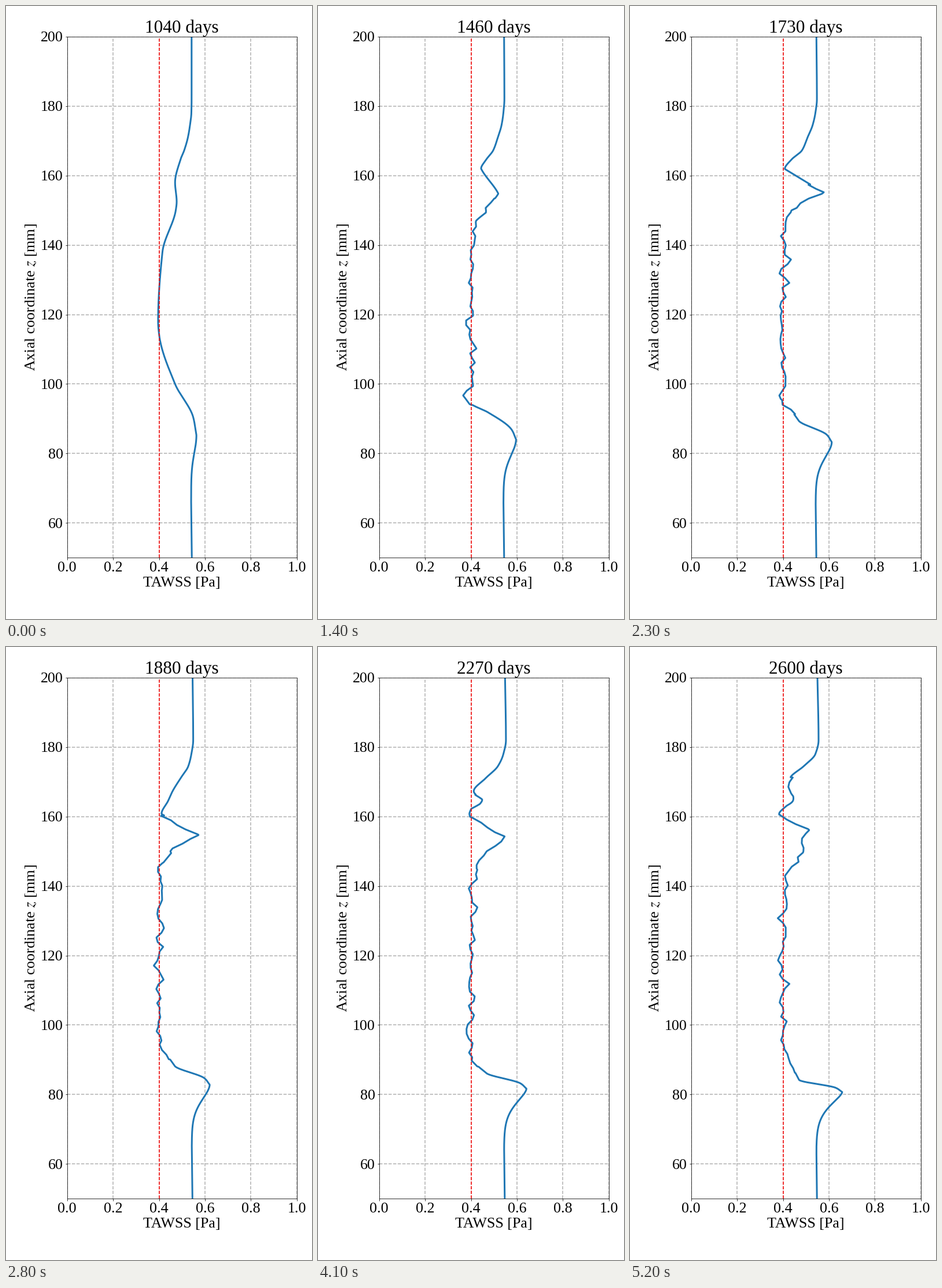
A matplotlib script for the animation above (5300 ms loop, 529 by 1058 pixels).

```python
import numpy as np
import matplotlib.pyplot as plt
from matplotlib.animation import FuncAnimation

WIDTH, HEIGHT, DPI = 529, 1058, 72
FRAMES, INTERVAL = 53, 100
FIRST_DAY, DAY_STEP = 1040, 30

plt.rcParams.update({
    "font.family": "Liberation Serif",
    "mathtext.fontset": "stix",
    "font.size": 26,
})

# How each feature of the curve moves: positions in mm, stresses in mPa.
TIMES = [0, 9, 14, 23, 33, 41, 52]
FOOT = [100, 95.8, 92, 89.3, 86.9, 86, 84.2]
PLATEAU = [114, 98.6, 94.2, 95.7, 93.2, 89.7, 93]
RISE = [138, 142, 147, 149, 144, 145, 143]
FLANK_X = [473, 478, 460, 418, 468, 467, 470]
PEAK = [152.5, 153.7, 154.8, 155.2, 154.2, 154.3, 156.1]
PEAK_X = [477, 501, 519, 575, 572, 550, 497]
VALLEY = [158, 161.8, 162, 161.9, 159.6, 159.9, 160.6]
VALLEY_X = [470, 458, 444, 408, 414, 405, 386]
SHOULDER = {
    164.5: [493, 475, 465, 435, 444, 444, 444],
    167.3: [510, 502, 497, 483, 435, 412, 425],
    171: [526, 521, 517, 507, 480, 463, 431],
    174.5: [535, 533, 533, 529, 526, 517, 490],
}


def monotone_cubic(z, zp, xp):
    h = np.diff(zp)
    d = np.diff(xp) / h
    m = np.concatenate([d[:1], np.zeros(len(d) - 1), d[-1:]])
    same = d[:-1] * d[1:] > 0
    a, b = d[:-1][same], d[1:][same]
    m[1:-1][same] = 2 * a * b / (a + b)
    i = np.clip(np.searchsorted(zp, z, side="right") - 1, 0, len(h) - 1)
    t = (z - zp[i]) / h[i]
    return (xp[i] * (1 + 2 * t) * (1 - t) ** 2 + xp[i + 1] * t * t * (3 - 2 * t)
            + h[i] * t * (1 - t) * (m[i] * (1 - t) - m[i + 1] * t))


def ripple(z, frame, low, high):
    """Jagged noise between low and high, growing over the first frames."""
    nodes = np.arange(low, high, 1.35)
    noise = np.random.default_rng(frame).normal(0, 9, len(nodes) + 1)
    noise = noise[1:] + 0.6 * noise[:-1]
    return min(frame / 6, 1) * np.interp(z, nodes, noise, left=0, right=0)


def curve(frame):
    s = frame / (FRAMES - 1)

    def at(track):
        return np.interp(frame, TIMES, track)

    foot, valley = at(FOOT), at(VALLEY)
    low_z = 85.3 - 4.6 * s
    low_x = 563 + 95 * s ** 0.8
    points = [
        (low_z, low_x),
        (low_z + 0.35 * (foot - low_z), low_x - 0.15 * (low_x - 470)),
        (foot, 470), (at(PLATEAU), 401), (118, 396), (at(RISE), 415),
        (150, at(FLANK_X)), (at(PEAK), at(PEAK_X)), (valley, at(VALLEY_X)),
        *((z, at(track)) for z, track in SHOULDER.items()),
        (178, 541), (182, 542 + 13 * s), (200, 542 + 8 * s),
    ]
    zp, xp = np.array(points).T

    lower = np.linspace(50, low_z, 150)
    tail = 540 + 5 * s + np.clip((65 - lower) / 5, 0, None)
    hump = np.exp(-((low_z - lower) / (7.2 - 1.8 * s)) ** (2 - 0.5 * s))
    lower_x = tail + (low_x - 540 - 5 * s) * hump

    upper = np.linspace(low_z, 200, 1200)
    upper_x = monotone_cubic(upper, zp, xp)
    sharp = (upper > foot) & (upper < valley)
    straight = np.interp(upper[sharp], zp, xp)
    upper_x[sharp] += min(frame / 20, 1) * (straight - upper_x[sharp])
    upper_x += ripple(upper, frame, foot + 2, 147 + 25 * s)

    return np.append(lower_x, upper_x) / 1000, np.append(lower, upper)


fig, ax = plt.subplots(figsize=((WIDTH + 1e-6) / DPI, (HEIGHT + 1e-6) / DPI), dpi=DPI)
fig.subplots_adjust(left=0.2, right=0.95, bottom=0.1, top=0.95)
line, = ax.plot([], [], color="tab:blue", lw=3)
ax.axvline(0.4, color="red", ls="--", lw=1.5)
ax.set(xlim=(0, 1), ylim=(50, 200), yticks=range(60, 201, 20),
       xlabel="TAWSS [Pa]", ylabel="Axial coordinate $z$ [mm]")
ax.grid(ls="--", lw=1.5)
title = ax.set_title("")


def update(frame):
    line.set_data(*curve(frame))
    title.set_text(f"{FIRST_DAY + DAY_STEP * frame} days")
    return line, title


anim = FuncAnimation(fig, update, frames=FRAMES, interval=INTERVAL, repeat=True)
plt.show()
```
